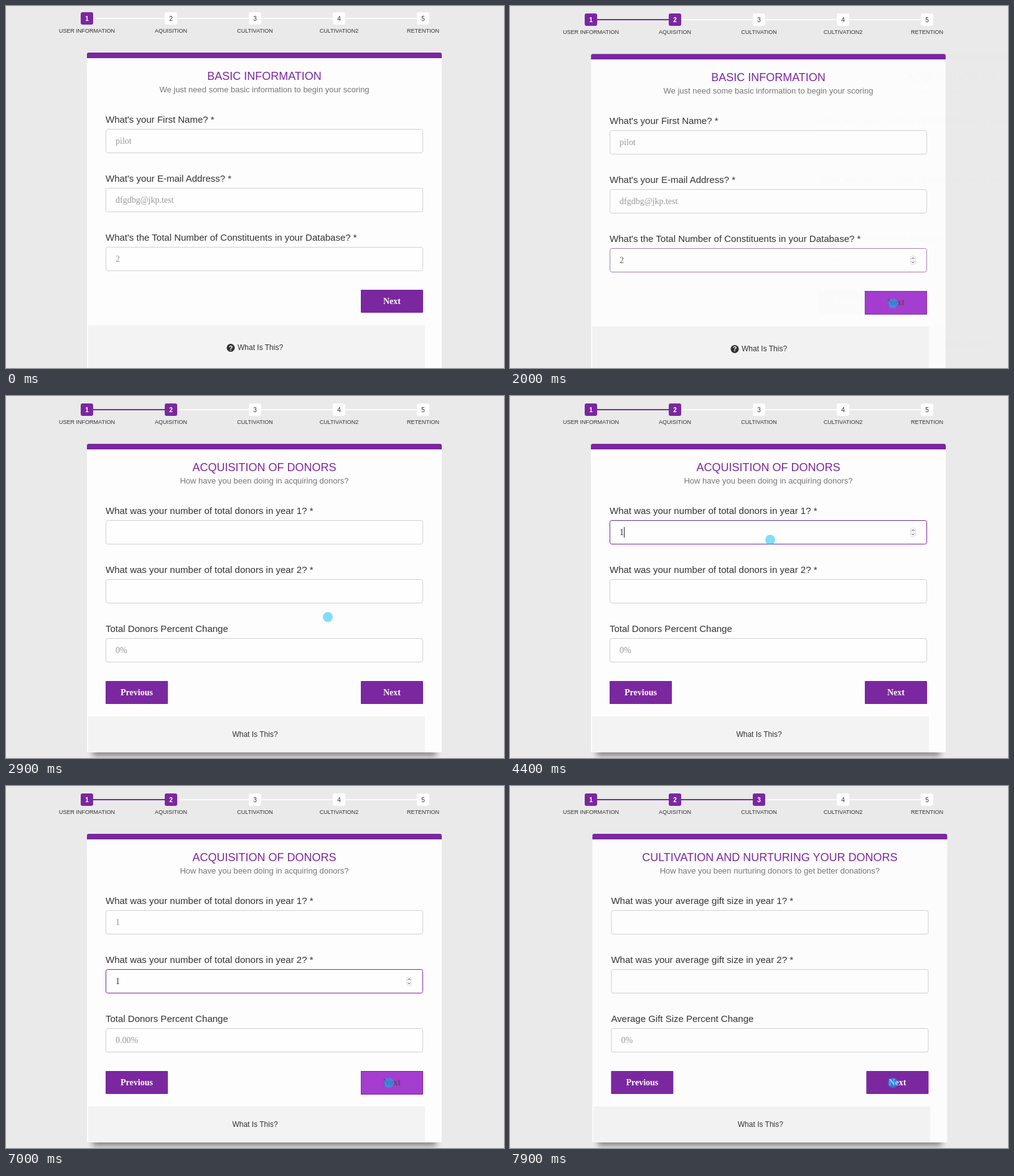
An HTML page for the animation above (8 s loop, 800 by 583 pixels).

```html
<!DOCTYPE html>
<html lang="en">
<head>
<meta charset="utf-8">
<title>Scoring form</title>
<style>
  html, body { margin: 0; width: 100%; height: 100%; overflow: hidden; background: #eaeaea; }
  svg { display: block; width: 800px; height: 583px; }
  text { font-family: "Liberation Sans", Arial, sans-serif; white-space: pre; }
  .serif { font-family: "Liberation Serif", "Times New Roman", serif; font-size: 14px; }
  .mid { text-anchor: middle; }
</style>
</head>
<body>
<svg viewBox="0 0 800 583">
  <defs>
    <filter id="soft" x="-10%" y="-10%" width="120%" height="120%">
      <feGaussianBlur stdDeviation="5"/>
    </filter>
  </defs>
  <g id="stage"></g>
</svg>
<script>
const LOOP = 8000, TICK = 100, SLIDE = 800;
const PURPLE = '#7b27a0', INK = '#333333';
const CENTER = 415, TRAVEL = 337.5;
const SLIDES = [1905, 7254];
const STEPS = ['USER INFORMATION', 'AQUISITION', 'CULTIVATION', 'CULTIVATION2', 'RETENTION'];
const stage = document.getElementById('stage');

const clamp = v => Math.max(0, Math.min(1, v));
const easeInOutExpo = p => p <= 0 ? 0 : p >= 1 ? 1
  : p < .5 ? 2 ** (20 * p - 10) / 2 : 1 - 2 ** (10 - 20 * p) / 2;

function mix(from, to, k) {
  const channel = (hex, i) => parseInt(hex.slice(i, i + 2), 16);
  return `rgb(${[1, 3, 5].map(i => Math.round(channel(from, i) * (1 - k) + channel(to, i) * k))})`;
}

const rect = (x, y, w, h, fill, extra = '') =>
  `<rect x="${x}" y="${y}" width="${w}" height="${h}" fill="${fill}" ${extra}/>`;
const text = (x, y, size, fill, str, extra = '') =>
  `<text x="${x}" y="${y}" font-size="${size}" fill="${fill}" ${extra}>${str}</text>`;

// Pointer path: time, x, y
const PATH = [
  [200, 637, 120], [300, 637, 313], [500, 637, 325], [800, 636, 400], [1000, 634, 412],
  [1100, 614, 499], [1200, 615, 486], [1300, 615, 479], [2700, 615, 479], [3100, 419, 233],
  [3200, 418, 231.5], [4700, 418, 231.5], [4900, 420, 315], [5500, 421, 318], [5900, 388, 410],
  [6100, 394, 419], [6500, 394, 419], [6700, 625, 448], [6800, 625, 448], [7000, 615, 478], [LOOP, 615, 478]
];

function pointer(t) {
  const sinceClick = Math.min(...SLIDES.map(s => t < s ? LOOP : t - s));
  if (t < PATH[0][0] || (sinceClick > 150 && sinceClick < 350)) return '';
  const i = PATH.findIndex(p => p[0] > t);
  const [t0, x0, y0] = PATH[i - 1], [t1, x1, y1] = PATH[i];
  const k = (t - t0) / (t1 - t0);
  const x = x0 + (x1 - x0) * k, y = y0 + (y1 - y0) * k;
  const paint = t === 1100
    ? 'r="9.5" fill="none" stroke="#c3e3f0" stroke-width="1.5"'
    : 'r="8" fill="rgba(0,190,255,.5)"';
  return `<circle cx="${x}" cy="${y}" ${paint}/>`;
}

function progress(active) {
  let out = '';
  STEPS.forEach((name, i) => {
    const x = 130 + 135 * i, on = i <= active;
    if (i) out += rect(x - 125, 19, 115, 2, on ? PURPLE : '#fbfbfb');
    out += rect(x - 10, 10, 20, 20, on ? PURPLE : '#fdfdfd', 'rx="3"')
      + text(x, 23.5, 10, on ? '#fff' : INK, i + 1, `class="mid" ${on ? 'font-weight="bold"' : ''}`)
      + text(x, 43, 9, INK, name, 'class="mid"');
  });
  return out;
}

function spinner(y) {
  return rect(643.5, y + 12.5, 8, 14, '#fafafa', 'rx="3" stroke="#dddddd"')
    + `<path d="M645.5 ${y + 17.5}l2-2.5 2 2.5M645.5 ${y + 21.5}l2 2.5 2-2.5" fill="none" stroke="#555"/>`;
}

function field(row, { label, value = '', focus = 0, caret = false }) {
  const y = 198 + 95 * row;
  let out = text(160, y - 10, 15, INK, label)
    + rect(160.5, y + .5, 509, 38, '#fefefe', `rx="3" stroke="${mix('#d0d0d0', PURPLE, focus)}"`)
    + text(176, y + 24, 14, mix('#999999', INK, focus), value, 'class="serif"');
  if (caret) out += rect(value ? 183 : 176, y + 11, 1, 17, '#222');
  return out + (focus ? spinner(y) : '');
}

function button(x, label, hover) {
  const box = hover
    ? rect(x + .5, 457.5, 99, 37, '#a43dd0', `stroke="${PURPLE}"`)
    : rect(x, 457, 100, 37, PURPLE, 'rx="1"');
  return box + text(x + 50, 480, 14, hover ? '#5c4565' : '#fff', label, 'class="serif mid" font-weight="bold"');
}

function page({ title, sub, bottom, fields, first, hover }) {
  const mid = 'class="mid"';
  const help = first
    ? '<circle cx="361" cy="550.5" r="6.5" fill="#333"/>'
      + text(361, 554.5, 11, '#fff', '?', mid + ' font-weight="bold"')
      + text(372, 554, 12, INK, 'What Is This?')
    : text(400, 547, 12, INK, 'What Is This?', mid);
  return rect(139, 100, 552, bottom - 94, '#000', 'opacity=".42" filter="url(#soft)"')
    + rect(130, 75, 570, bottom - 75, '#fdfdfd', 'rx="3"')
    + rect(132, 514, 541, bottom - 514, '#f3f3f3')
    + `<path d="M130 84v-6q0-3 3-3h564q3 0 3 3v6z" fill="${PURPLE}"/>`
    + text(CENTER, 119, 18, PURPLE, title, mid)
    + text(CENTER, 139, 13, '#777', sub, mid)
    + fields.map((f, i) => field(i, f)).join('')
    + (first ? '' : button(160, 'Previous'))
    + button(570, 'Next', hover) + help;
}

// Focus fades in and out; the caret blinks from its last reset.
function focusState(t, from, to, reset = from) {
  const active = t >= from && t < to;
  return {
    focus: Math.min(clamp((t - from + 100) / 400) * (t >= from), 1 - clamp((t - to) / 300)),
    caret: active && Math.floor((t - reset) / 500) % 2 === 0
  };
}

function pages(t) {
  const typed1 = t >= 4400, typed2 = t >= 5400;
  return [
    {
      title: 'BASIC INFORMATION',
      sub: 'We just need some basic information to begin your scoring',
      bottom: 586, first: true, hover: t >= 1200,
      fields: [
        { label: "What's your First Name? *", value: 'pilot' },
        { label: "What's your E-mail Address? *", value: 'dfgdbg@jkp.test' },
        { label: "What's the Total Number of Constituents in your Database? *", value: '2', ...focusState(t, 900, 1850) }
      ]
    },
    {
      title: 'ACQUISITION OF DONORS',
      sub: 'How have you been doing in acquiring donors?',
      bottom: 572, hover: t >= 7000,
      fields: [
        { label: 'What was your number of total donors in year 1? *', value: typed1 ? '1' : '', ...focusState(t, 3400, 4900) },
        { label: 'What was your number of total donors in year 2? *', value: typed2 ? '1' : '', ...focusState(t, 4900, 7150, typed2 ? 5400 : 4900) },
        { label: 'Total Donors Percent Change', value: typed2 ? '0.00%' : '0%' }
      ]
    },
    {
      title: 'CULTIVATION AND NURTURING YOUR DONORS',
      sub: 'How have you been nurturing donors to get better donations?',
      bottom: 572,
      fields: [
        { label: 'What was your average gift size in year 1? *' },
        { label: 'What was your average gift size in year 2? *' },
        { label: 'Average Gift Size Percent Change', value: '0%' }
      ]
    }
  ];
}

function draw(t) {
  const all = pages(t);
  const active = SLIDES.filter(s => t >= s).length;
  const pos = active ? easeInOutExpo((t - SLIDES[active - 1]) / SLIDE) : 1;
  const left = 1 - pos;
  let out = progress(active);
  if (left > 0) {
    const prev = all[active - 1], scale = 1 - pos * .2, cy = (75 + prev.bottom) / 2;
    out += `<g opacity="${left}" transform="translate(${CENTER} ${cy}) scale(${scale}) translate(${-CENTER} ${-cy})">${page(prev)}</g>`;
  }
  out += `<g opacity="${pos}" transform="translate(${left * TRAVEL} 0)">${page(all[active])}</g>`;
  stage.innerHTML = `<g transform="translate(0 ${active ? 2 : 0})">${out}</g>` + pointer(t);
}

let last = -1;
function tick(now) {
  const t = Math.floor(now % LOOP / TICK) * TICK;
  if (t !== last) draw(last = t);
  requestAnimationFrame(tick);
}
draw(0);
requestAnimationFrame(tick);
</script>
</body>
</html>
```
